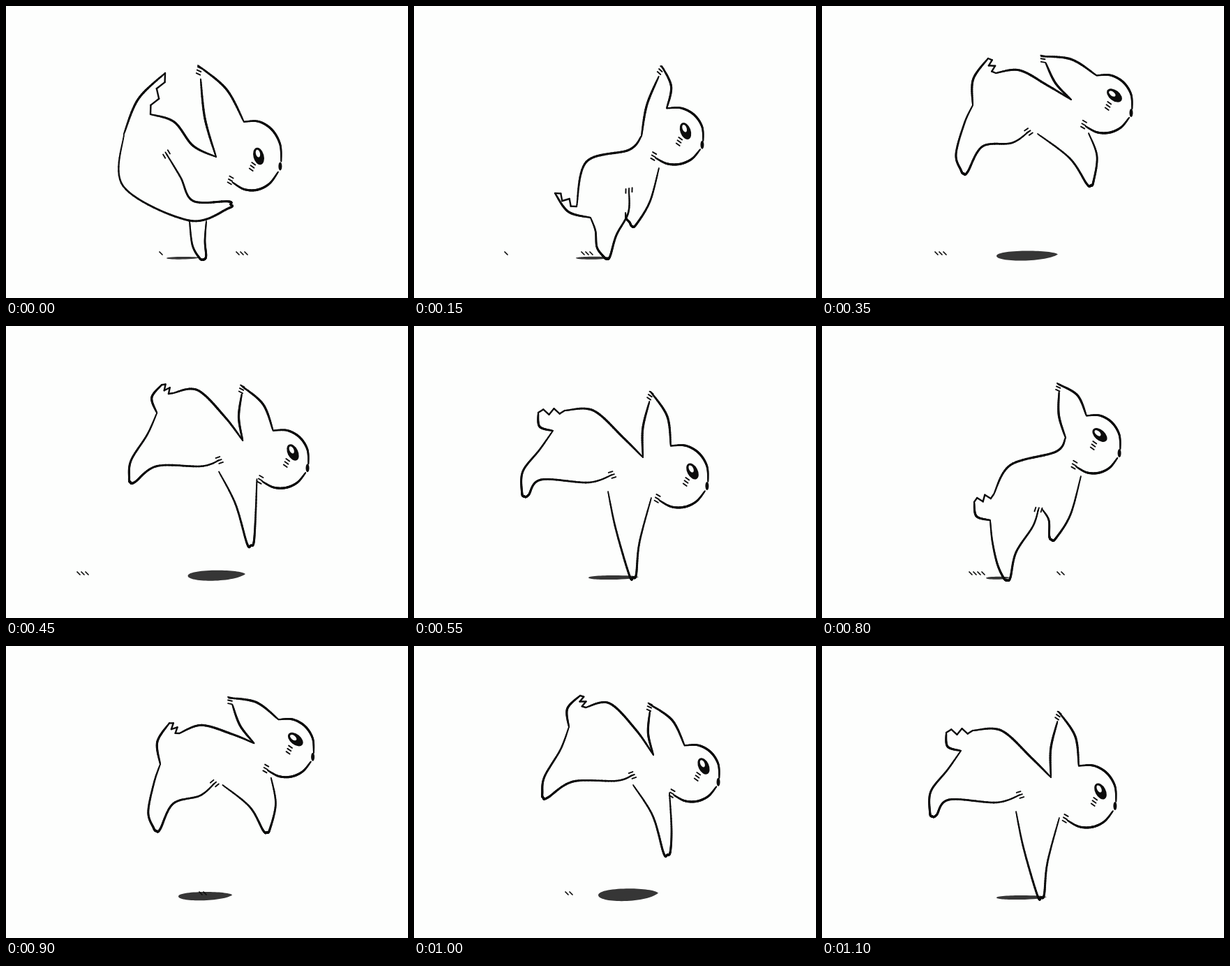
Recreate the animation shown at these times as an HTML page with a canvas. Size 576 by 418 pixels, loop 1150 ms.

```html
<!DOCTYPE html>
<html lang="en">
<head>
<meta charset="utf-8">
<title>Running rabbit</title>
<style>
html, body { margin: 0; width: 100%; height: 100%; overflow: hidden; background: #fdfefd; }
canvas { display: block; }
</style>
</head>
<body>
<canvas id="stage" width="576" height="418"></canvas>
<script>
const ctx = document.getElementById('stage').getContext('2d');
const LOOP = 1150, STEP = 50, STRIDE = 575;
const INK = '#0c0c0c', PAPER = '#fdfefd', SHADE = '#363636';
const HIND_FOOT = 3, FORE_FOOT = 2, GROUND = 362, SCROLL = 0.6;

// Each pose is a handful of joints; ears, face, toes, tuft and fur are derived from them.
// head: x, y, rx, ry. eye: x, y, angle. shadow: x, half width, half height.
const crouch = {
  back: [[207,155], [241,166], [268,200], [301,216]],
  hind: [[169,183], [168,258], [262,307], [322,284], [268,279], [250,245], [230,212]],
  fore: [[263,308], [267,342], [283,363], [285,336], [287,308]],
  ear: [275,85], tail: [228,96], head: [352,214,43,50], eye: [362,215,-15], shadow: [254,24,1.8]
};
const push = {
  back: [[233,287], [247,223], [308,206], [326,186]],
  hind: [[253,303], [260,322], [262,345], [276,362], [290,328], [307,296], [308,264]],
  fore: [[303,296], [304,304], [312,315], [338,280], [351,232]],
  ear: [355,86], tail: [202,268], head: [373,186,42,41], eye: [389,179,-20], shadow: [257,25,2]
};
const lift = {
  back: [[246,241], [270,199], [335,180], [349,160]],
  hind: [[241,278], [244,308], [251,340], [265,364], [278,324], [302,287], [310,263]],
  fore: [[316,263], [325,278], [329,306], [356,270], [371,215]],
  ear: [338,83], tail: [218,252], head: [389,169,39,42], eye: [398,156,-48], shadow: [252,17,2]
};
const fly = {
  back: [[249,96], [283,92], [322,113], [357,134]],
  hind: [[216,142], [204,168], [192,212], [203,240], [230,201], [272,196], [296,180]],
  fore: [[309,183], [355,218], [385,257], [394,215], [382,182]],
  ear: [314,72], tail: [238,75], head: [404,140,41,42], eye: [419,128,-52], shadow: [294,44,7]
};
const fall = {
  back: [[246,88], [280,82], [318,120], [343,156]],
  hind: [[222,116], [210,148], [187,187], [185,217], [228,194], [290,193], [313,185]],
  fore: [[314,199], [342,243], [363,299], [369,262], [366,210]],
  ear: [337,83], tail: [238,71], head: [398,182,40,41], eye: [415,172,-25], shadow: [307,43,9]
};
const land = {
  back: [[216,121], [257,121], [300,160], [328,188]],
  hind: [[199,150], [180,177], [156,208], [158,244], [182,220], [250,224], [284,213]],
  fore: [[278,237], [289,290], [314,360], [323,310], [340,246]],
  ear: [339,94], tail: [178,124], head: [379,215,43,45], eye: [399,208,-28], shadow: [286,36,3]
};
const keys = [[0, crouch], [25, crouch], [150, push], [225, lift], [350, fly], [425, fall], [525, land], [STRIDE, land]];

// start, end, place on the scrolling ground, blades
const grass = [[0, 200, 338, 3], [0, 200, 222, 1], [250, 450, 380, 3], [600, 850, 702, 4], [750, 1050, 822, 2]];

const rad = deg => deg * Math.PI / 180;
const mix = (a, b, u) => typeof a === 'number' ? a + (b - a) * u : a.map((v, i) => mix(v, b[i], u));

// Point at share u from a to b, moved sideways by k
function beside(a, b, u, k) {
  const dx = b[0] - a[0], dy = b[1] - a[1], d = Math.hypot(dx, dy) || 1;
  return [a[0] + dx * u + dy / d * k, a[1] + dy * u - dx / d * k];
}
const bow = (a, b, k) => [a, beside(a, b, 0.5, k), b];
const slope = (a, b) => Math.atan2(b[1] - a[1], b[0] - a[0]);

function poseAt(phase) {
  const i = keys.findIndex(k => k[0] > phase) - 1;
  const [t0, a] = keys[i], [t1, b] = keys[i + 1];
  const pose = {};
  for (const part in a) pose[part] = mix(a[part], b[part], (phase - t0) / (t1 - t0));
  return pose;
}

function line(a, b, width) {
  ctx.lineWidth = width;
  ctx.beginPath();
  ctx.moveTo(...a);
  ctx.lineTo(...b);
  ctx.stroke();
}

const spline = (a, b, c, d, u) =>
  b + u * (c - a + u * (2 * a - 5 * b + 4 * c - d + u * (3 * (b - c) + d - a))) / 2;

// Smooth stroke with tapered ends, like a brush pen
function brush(points) {
  const last = points.length - 1, SUB = 14, total = last * SUB;
  const at = i => points[Math.max(0, Math.min(last, i))];
  let from = points[0];
  for (let n = 1; n <= total; n++) {
    const i = Math.min(last - 1, Math.floor(n / SUB)), u = n / SUB - i;
    const to = [0, 1].map(k => spline(at(i - 1)[k], at(i)[k], at(i + 1)[k], at(i + 2)[k], u));
    line(from, to, 1.4 + 1.8 * Math.sqrt(Math.sin(Math.PI * n / (total + 1))));
    from = to;
  }
}

// Turns the foot joint into a rounded toe
function limb(joints, foot) {
  const toe = joints[foot], shin = mix(joints[foot - 1], joints[foot + 1], 0.5);
  const reach = 1 - 4 / Math.hypot(toe[0] - shin[0], toe[1] - shin[1]);
  const sides = [5, -5].map(k => beside(shin, toe, reach, k));
  if (Math.hypot(sides[0][0] - joints[foot - 1][0], sides[0][1] - joints[foot - 1][1]) >
      Math.hypot(sides[1][0] - joints[foot - 1][0], sides[1][1] - joints[foot - 1][1])) sides.reverse();
  brush([...joints.slice(0, foot), sides[0], toe, sides[1], ...joints.slice(foot + 1)]);
}

function tuft(from, tip, to) {
  brush(bow(from, tip, 11));
  const edge = [tip];
  for (let i = 1; i < 5; i++) edge.push(beside(tip, to, i / 5, i % 2 ? 4 : -4));
  edge.push(to);
  for (let i = 1; i < edge.length; i++) line(edge[i - 1], edge[i], 2.4);
}

function fur([x, y], angle) {
  ctx.save();
  ctx.translate(x, y);
  ctx.rotate(angle);
  for (const k of [-1, 0, 1]) line([k - 3, k * 4.5], [k + 3, k * 4.5], 1.9);
  ctx.restore();
}

function oval(x, y, rx, ry, angle, color) {
  ctx.fillStyle = color;
  ctx.beginPath();
  ctx.ellipse(x, y, rx, ry, angle, 0, 2 * Math.PI);
  ctx.fill();
}

function drawHead({ head: [x, y, rx, ry], eye: [ex, ey, tilt], ear, back }) {
  const rim = deg => [x + rx * Math.cos(rad(deg)), y + ry * Math.sin(rad(deg))];
  const arc = (from, to) => [0, 1, 2, 3, 4].map(i => rim(mix(from, to, i / 4)));
  brush(arc(-105, 10));
  brush(arc(28, 130));
  oval(...rim(18), 2.5, 6, 0, INK);

  const neck = back[back.length - 1], brow = rim(-105);
  brush(bow(ear, brow, 10));
  brush(bow(mix(ear, neck, 0.15), neck, -5));
  fur(mix(ear, neck, 0.06), slope(ear, brow) / 2);
  fur(rim(135), rad(30));
  fur([ex - 9, ey + 15], rad(35));

  const a = rad(tilt);
  oval(ex, ey, 7.5, 12.5, a, INK);
  oval(ex + 4 * Math.sin(a), ey - 4 * Math.cos(a), 3, 5.5, a, PAPER);
}

function drawShadow([x, w, h]) {
  const y = GROUND - 0.6 * h, bulge = h * 4 / 3;
  ctx.fillStyle = SHADE;
  ctx.beginPath();
  ctx.moveTo(x - w, y);
  ctx.bezierCurveTo(x - w, y - bulge, x + w * 0.8, y - bulge, x + w, y - h / 3);
  ctx.bezierCurveTo(x + w * 0.6, y + bulge, x - w, y + bulge, x - w, y);
  ctx.fill();
}

function drawGrass(t) {
  for (const [from, to, place, blades] of grass) {
    if (t < from || t > to) continue;
    for (let i = 0; i < blades; i++) {
      const x = place - SCROLL * t + 6 * (i - (blades - 1) / 2);
      line([x - 2, 352], [x + 2, 356], 1.7);
    }
  }
}

function draw(t) {
  ctx.fillStyle = PAPER;
  ctx.fillRect(0, 0, 576, 418);
  ctx.strokeStyle = INK;
  ctx.lineCap = 'round';
  const pose = poseAt(t < 600 ? Math.min(t, 550) : t - STRIDE);
  const { back, hind, fore, tail, shadow } = pose;
  drawShadow(shadow);
  drawGrass(t);
  brush(back);
  limb(hind, HIND_FOOT);
  limb(fore, FORE_FOOT);
  tuft(hind[0], tail, back[0]);
  const [groin, belly] = hind.slice(-2);
  fur(belly, slope(groin, belly));
  drawHead(pose);
}

const start = performance.now();
function tick() {
  const t = (performance.now() - start) % LOOP;
  draw(Math.floor(t / STEP) * STEP);
  requestAnimationFrame(tick);
}
tick();
</script>
</body>
</html>
```
